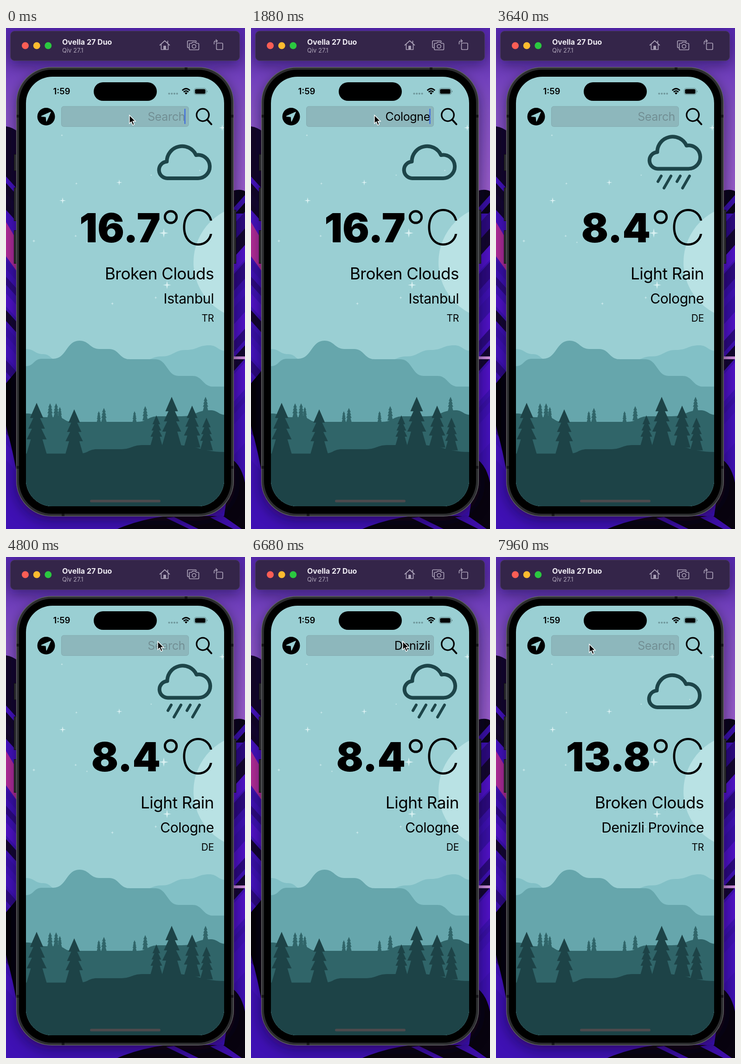
Write an HTML page that moves like this. It is 515 px wide and 1080 px high and loops after 8000 ms.

```html
<!DOCTYPE html>
<html lang="en">
<head>
<meta charset="utf-8">
<title>Weather search</title>
<style>
  html, body { margin: 0; width: 100%; height: 100%; overflow: hidden; background: #3a10a8; }
  svg { display: block; width: 100vw; height: 100vh; font-family: Inter, Roboto, sans-serif; }
  .right { text-anchor: end; letter-spacing: -.014em; }
  .line { fill: none; stroke-linecap: round; stroke-linejoin: round; }
</style>
</head>
<body>
<svg viewBox="0 0 515 1080">
  <defs>
    <linearGradient id="dusk" x1="0" y1="0" x2="0" y2="1">
      <stop offset="0" stop-color="#5527ae"/>
      <stop offset=".5" stop-color="#8350c4"/>
      <stop offset="1" stop-color="#985ccb"/>
    </linearGradient>
    <filter id="soft" x="-30%" y="-30%" width="160%" height="160%"><feGaussianBlur stdDeviation="14"/></filter>
    <clipPath id="screen"><rect x="43" y="105" width="427" height="926" rx="57"/></clipPath>
  </defs>

  <g id="wallpaper">
    <rect width="515" height="1080" fill="#3f11b4"/>
    <rect width="515" height="352" fill="url(#dusk)"/>
    <path fill="#130629" d="M0 212Q14 214 26 224V420H0Z"/>
    <path fill="#0a0417" d="M488 351Q505 346 515 352V400H488Z"/>
    <g id="streaks"></g>
    <path fill="#b02c98" d="M0 418L26 462V528L0 492Z"/>
    <path fill="#040208" d="M0 766L26 735V975Q16 915 0 858Z"/>
    <path fill="#cf8edc" d="M488 708H515V714H488Z"/>
    <path fill="#08030f" d="M488 930Q508 945 515 980V1080H240Q286 1060 345 1052H470Z"/>
    <path fill="#3c0ea6" d="M345 1056L395 1080H415L362 1054ZM440 1055L490 1080H508L465 1050Z"/>
    <g filter="url(#soft)" fill="#10051f">
      <rect x="9" y="14" width="495" height="66" rx="9" opacity=".4"/>
      <rect x="20" y="98" width="474" height="964" rx="78" opacity=".5"/>
    </g>
  </g>

  <g id="toolbar">
    <rect x="9.5" y="6.5" width="494" height="64" rx="9" fill="#342549" stroke="#4b3b63"/>
    <circle cx="41.5" cy="38" r="7.5" fill="#fb5e55"/>
    <circle cx="66.2" cy="38" r="7.5" fill="#fdbb2f"/>
    <circle cx="90.8" cy="38" r="7.5" fill="#2bc840"/>
    <text x="121" y="36" font-size="16" font-weight="700" fill="#f0edf4">Ovella 27 Duo</text>
    <text x="121" y="53" font-size="13" fill="#ada4b8">Qiv 27.1</text>
    <g class="line" stroke="#aaa1b7" stroke-width="1.7">
      <path d="M331.5 37L342 27.5L352.5 37M334.5 35V46.5H349.5V35M348.5 32V28"/>
      <path d="M340 46V39H344V46" fill="#aaa1b7"/>
      <path d="M394 42.5H393Q391 42.5 391 40.5V29.500Q391 27.500 393 27.500H408Q410 27.500 410 29.500"/>
      <path d="M397 33H400L402 30.500H408L410 33H413.500Q415.500 33 415.500 35V45Q415.500 47 413.500 47H397Q395 47 395 45V35Q395 33 397 33Z"/>
      <circle cx="405.2" cy="39.5" r="4"/>
      <rect x="453.5" y="32.5" width="13.5" height="14" rx="2"/>
      <path d="M448.5 34.5V31.5Q448.5 28 452 28H455M452.5 25L455.5 28L452.5 31"/>
    </g>
  </g>

  <g id="body">
    <g fill="#29292c" stroke="#111">
      <rect x="17.5" y="272.5" width="8" height="35"/>
      <rect x="17.5" y="344.5" width="8" height="71"/>
      <rect x="17.5" y="436.5" width="8" height="71"/>
      <rect x="487.5" y="392.5" width="8" height="115"/>
    </g>
    <rect x="22.7" y="84.7" width="467.6" height="967.6" rx="76" fill="#2c2d2f" stroke="#626466" stroke-width="1.4"/>
    <path fill="#151517" d="M23 187h6v6h-6zM484 187h6v6h-6zM23 944h6v6h-6zM484 944h6v6h-6zM385 85h6v6h-6zM120 1046h6v6h-6z"/>
    <rect x="28" y="90" width="457" height="957" rx="71"/>
  </g>

  <g clip-path="url(#screen)">
    <rect x="43" y="105" width="427" height="926" fill="#9acfd3"/>
    <circle cx="527" cy="505" r="123" fill="#b9e2e4"/>
    <path id="stars" fill="#d9f1f2"/>
    <g id="land"></g>
    <rect x="181" y="1017" width="152" height="5.5" rx="2.7" fill="#4c4a4d"/>
  </g>

  <g id="status">
    <text x="101.5" y="143" font-size="18.5" font-weight="600">1:59</text>
    <rect x="189" y="117" width="136" height="40" rx="20"/>
    <path class="line" stroke="#6f979b" stroke-width="4" stroke-dasharray="0 5.7" d="M351.5 141.5h17.2"/>
    <path fill="none" stroke="#000" stroke-width="2.8" d="M379.8 134.6Q388 127 396.2 134.6M382.8 138Q388 133.3 393.2 138"/>
    <path d="M385 140Q388 137.5 391 140L388 143.5Z"/>
    <rect x="405.5" y="130" width="26" height="13.5" rx="4.3" fill="none" stroke="#587a7d"/>
    <rect x="407.3" y="131.8" width="22.4" height="9.9" rx="2.8"/>
    <path fill="#587a7d" d="M433 134.5Q435.5 136.7 433 139Z"/>
  </g>

  <g id="search">
    <circle cx="86.5" cy="191" r="19"/>
    <path d="M96 181.5L76.5 190.3L86.3 191.3L87.3 201Z" fill="#9acfd3" stroke="#9acfd3" stroke-width="1.5" stroke-linejoin="round"/>
    <rect x="119.5" y="169" width="274" height="43.5" rx="5" fill="#86a5ac" fill-opacity=".58" stroke="#83aaaf"/>
    <text id="query" class="right" x="386" y="200" font-size="25"></text>
    <rect id="caret" x="384.3" y="174" width="2.5" height="33" rx="1" fill="#426fdd"/>
    <g class="line" stroke="#000" stroke-width="3.3">
      <circle cx="424" cy="187.5" r="13.3"/>
      <path d="M433.5 197.5L442.5 207.5" stroke-width="4"/>
    </g>
  </g>

  <g id="report">
    <g class="line" stroke="#1d4549">
      <path id="cloud" stroke-width="8" d="M349 324A18 18 0 0 1 346.5 288A33 33 0 0 1 409.5 274A25.200 25.200 0 1 1 413 324Z"/>
      <path id="rain" stroke-width="6" d="M356 319l-7 12M377 319l-15 26M397 319l-7 12M417 319l-15 26"/>
    </g>
    <text id="degrees" x="333" y="461.5" font-size="86" font-weight="900" text-anchor="end"></text>
    <circle cx="355" cy="407.5" r="12.6" fill="none" stroke="#000" stroke-width="5"/>
    <text x="451" y="468" font-size="106" font-weight="250" text-anchor="end">C</text>
    <text id="sky" class="right" x="448" y="542" font-size="35"></text>
    <text id="city" class="right" x="448" y="594" font-size="30"></text>
    <text id="country" class="right" x="448" y="633" font-size="21"></text>
  </g>

  <path id="pointer" d="M0 0V18L4 14.3L7 21.3L10.3 19.9L7.3 13H13Z" stroke="#fff" stroke-width="1.4"/>
</svg>

<script>
const LOOP = 8000;
const el = id => document.getElementById(id);
const smooth = u => u * u * (3 - 2 * u);
const mix = (a, b, u) => a + (b - a) * u;

function seeded(seed) {
  return () => (seed = seed * 16807 % 2147483647) / 2147483647;
}

function addPath(parent, d, fill) {
  const path = document.createElementNS('http://www.w3.org/2000/svg', 'path');
  path.setAttribute('d', d);
  path.setAttribute('fill', fill);
  el(parent).append(path);
}

// Slanted streaks on both sides of the phone, mirrored in direction.
function drawStreaks() {
  const random = seeded(11);
  const tones = ['#14062f', '#2d0a80', '#4512be', '#3a10a8', '#5012c8'];
  for (const [x, slope, top] of [[0, 30, 320], [488, -30, 390]]) {
    for (let y = top; y < 900; y += 36) {
      const h = 14 + 24 * random();
      const tone = tones[Math.floor(random() * tones.length)];
      addPath('streaks', `M${x} ${y}l27 ${slope}v${h}l-27 ${-slope}Z`, tone);
    }
  }
}

function star(x, y, r) {
  const k = r * .17;
  return `M${x} ${y - r}l${k} ${r - k}l${r - k} ${k}l${k - r} ${k}l${-k} ${r - k}` +
    `l${-k} ${k - r}l${k - r} ${-k}l${r - k} ${-k}Z`;
}

function drawStars() {
  const random = seeded(5);
  const bright = [[340, 442, 10], [347, 554, 9], [122, 372, 7], [244, 333, 6.5], [466, 215, 7]];
  const faint = Array.from({ length: 9 }, () =>
    [mix(60, 450, random()), mix(150, 620, random()), mix(2, 4, random())]);
  el('stars').setAttribute('d', [...bright, ...faint].map(s => star(...s)).join(''));
}

// A ridge runs through its key points, level at each of them.
function ridgePath(keys) {
  const curve = keys.slice(1).map(([x, y], i) => {
    const [px, py] = keys[i], mid = (px + x) / 2;
    return `C${mid} ${py} ${mid} ${y} ${x} ${y}`;
  });
  return `M${keys[0]}${curve.join('')}V1031H${keys[0][0]}Z`;
}

function ridgeHeight(keys, x) {
  const i = keys.findIndex(k => k[0] > x);
  const [a, b] = [keys[i - 1], keys[i]];
  return mix(a[1], b[1], smooth((x - a[0]) / (b[0] - a[0])));
}

// Four tiers, each wider than the one above; the lowest stands on the ground.
function tree(x, base, h) {
  let d = '';
  for (let i = 0; i < 4; i++) {
    const top = base - h * (1 - i * .235), bottom = i < 3 ? base - h * (.7 - i * .21) : base + 1;
    const narrow = h * i * .037, wide = h * (.13 + Math.min(i, 2.1) * .033);
    d += `M${x - narrow} ${top}H${x + narrow}L${x + wide} ${bottom}H${x - wide}Z`;
  }
  return d;
}

function drawLand() {
  const distant = [[43, 692], [80, 703], [112, 716], [295, 716], [335, 708], [388, 694], [438, 684], [474, 696]];
  const middle = [[43, 729], [77, 713], [102, 713], [158, 674], [202, 692], [222, 692],
    [266, 714], [322, 714], [372, 750], [402, 750], [446, 773], [474, 773]];
  const wood = [[43, 831], [88, 839], [110, 839], [142, 849], [282, 849], [328, 837], [378, 837], [440, 824], [474, 834]];
  const front = [[43, 917.5], [158, 917.5], [196, 908], [246, 908], [296, 899], [360, 899], [474, 914]];
  const forest = (ridge, xs, height) =>
    xs.map((x, i) => tree(x, ridgeHeight(ridge, x), height(i))).join('');

  addPath('land', ridgePath(distant), '#82c0c6');
  addPath('land', ridgePath(middle), '#66a6ac');
  addPath('land', ridgePath(wood), '#306569');
  addPath('land', forest(wood, [95, 108, 211, 300, 430], () => 30), '#306569');
  addPath('land', forest(wood, [116, 200, 277], () => 23), '#306569');
  const tops = [808, 822, 835, 795, 814, 840], xs = [66, 147, 324, 357, 401, 432];
  addPath('land', ridgePath(front), '#1d4347');
  addPath('land', forest(front, xs, i => ridgeHeight(front, xs[i]) - tops[i]), '#1d4347');
}

const REPORTS = [
  { from: 0, degrees: '16.7', sky: 'Broken Clouds', city: 'Istanbul', country: 'TR' },
  { from: 2400, degrees: '8.4', sky: 'Light Rain', city: 'Cologne', country: 'DE', rain: true },
  { from: 6860, degrees: '13.8', sky: 'Broken Clouds', city: 'Denizli Province', country: 'TR' }
];
const TYPING = [
  { word: 'Cologne', start: 720, step: 150, end: 2400 },
  { word: 'Denizli', start: 5480, step: 170, end: 6860 }
];
const GLIDE = 350;
const MOVES = [
  { start: 2150, x: 530, y: 205 },
  { start: 4000, x: 327, y: 182 },
  { start: 6730, x: 246, y: 185 },
  { start: 7520, x: 201, y: 188 }
];

function pointerAt(t) {
  let x = 266, y = 188;
  for (const move of MOVES) {
    const u = smooth(Math.min(1, Math.max(0, (t - move.start) / GLIDE)));
    x = mix(x, move.x, u);
    y = mix(y, move.y, u);
  }
  return [x, y];
}

function typedAt(t) {
  const job = TYPING.find(j => t >= j.start && t < j.end);
  return job ? job.word.slice(0, 1 + Math.floor((t - job.start) / job.step)) : '';
}

function caretAt(t) {
  return t < 2400 || (t >= 4900 && t < 6860 && (t - 4900) % 1000 < 600);
}

function render(t) {
  const report = REPORTS.filter(r => r.from <= t).pop();
  for (const key of ['degrees', 'sky', 'city', 'country']) el(key).textContent = report[key];
  el('cloud').setAttribute('transform', report.rain ? 'translate(1 -20.5)' : '');
  el('rain').style.display = report.rain ? '' : 'none';

  const typed = typedAt(t);
  el('query').textContent = typed || 'Search';
  el('query').setAttribute('fill', typed ? '#000' : '#728f94');
  el('caret').style.display = caretAt(t) ? '' : 'none';
  el('pointer').setAttribute('transform', `translate(${pointerAt(t)})`);
}

drawStreaks();
drawStars();
drawLand();

const start = performance.now();
function tick() {
  render((performance.now() - start) % LOOP);
  requestAnimationFrame(tick);
}
tick();
</script>
</body>
</html>
```
